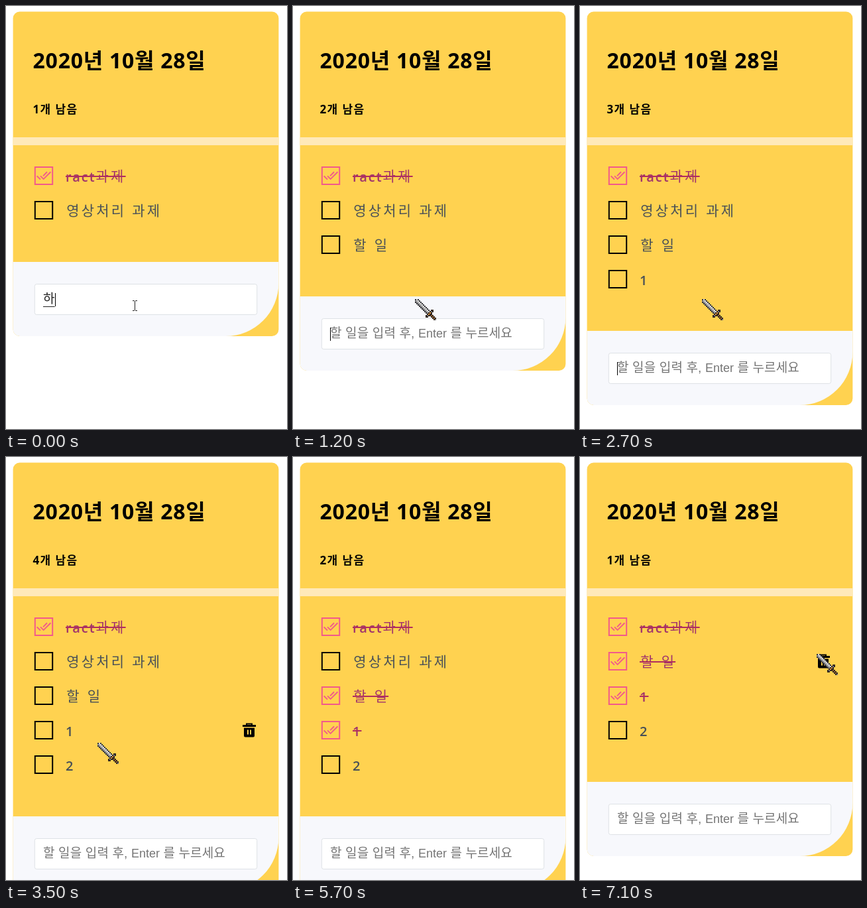
These frames come from a looping animation (424x638 px, 7700 ms). An HTML page:

```html
<!DOCTYPE html>
<html lang="ko">
<head>
<meta charset="utf-8">
<style>
html, body { margin: 0; width: 424px; height: 638px; overflow: hidden; background: #fff; }
svg { display: block; }
text { font-family: "Open Sans", "Noto Sans CJK KR", sans-serif; white-space: pre; }
.title { font-size: 32px; font-weight: 700; letter-spacing: .75px; }
.count { font-size: 17px; font-weight: 700; letter-spacing: 1.4px; }
.item { font-family: "Noto Sans CJK KR", sans-serif; font-size: 21px; font-weight: 300; letter-spacing: 3.2px; fill: #495057; }
.item .latin { font-family: "Open Sans", sans-serif; font-size: 20px; font-weight: 600; letter-spacing: 2px; baseline-shift: -1px; }
.done .item { fill: #a2356c; }
.field { font-family: "Liberation Sans", "Noto Sans CJK KR", sans-serif; font-size: 19px; font-weight: 300; letter-spacing: .15px; fill: #222; }
.field .latin { font-size: 18px; letter-spacing: 0; }
.field.hint { fill: #757575; }
</style>
</head>
<body>
<svg width="424" height="638" viewBox="0 0 424 638">
  <rect id="card" x="10.6" y="8.6" width="400.8" rx="10" fill="#ffd250"/>
  <rect x="10.6" y="198" width="400.8" height="12" fill="#ffe9b9"/>
  <text class="title" x="40.6" y="94.3">2020년 10월 28일</text>
  <text class="count" id="count" x="40.5" y="162"></text>
  <g id="list"></g>
  <g id="footer">
    <path d="M10.6 0H411.4V32A80 80 0 0 1 331.4 112H20.6A10 10 0 0 1 10.6 102Z" fill="#f7f8fc"/>
    <rect x="43.3" y="33.5" width="335.4" height="46" rx="3" fill="#fff" stroke="#dee2e6"/>
    <text class="field" id="field" x="56" y="62"></text>
    <rect id="underline" x="56" y="67" height="1" fill="#222"/>
    <rect id="caret" y="47" width="1" height="20" fill="#000"/>
  </g>
  <g id="trash">
    <path d="M362 -11H372V-8.5H377V-5.5H357V-8.5H362ZM364 -9V-8.5H370V-9ZM359 -4H375V8Q375 10 373 10H361Q359 10 359 8ZM364 -1V6H366V-1ZM368 -1V6H370V-1Z" fill-rule="evenodd"/>
  </g>
  <path id="beam" d="M191 444.5H193.5L194.5 445.5L195.5 444.5H198M194.5 445V459M191 459.5H193.5L194.5 458.5L195.5 459.5H198" fill="none" stroke="#222"/>
  <g id="sword" shape-rendering="crispEdges"></g>
</svg>
<script>
const LOOP = 7700, ROW = 52, LIST_TOP = 230;
const $ = id => document.getElementById(id);
const CHECK = 'M18 7l-1.41-1.41-6.34 6.34 1.41 1.41L18 7zm4.24-1.41L11.66 16.17 7.48 12l-1.41 1.41L11.66 19l12-12-1.42-1.41zM.41 13.41L6 19l1.41-1.41L1.83 12 .41 13.41z';
const HINT = '할 일을 입력 후, Enter 를 누르세요';

const items = [
  { text: 'ract과제', done: 0 },
  { text: '영상처리 과제', gone: 6400 },
  { text: '할 일', add: 900, done: 5100 },
  { text: '1', add: 2500, done: 4100 },
  { text: '2', add: 3000 }
];
const typing = [
  [0, '하'], [100, '할'], [300, '할 '], [500, '할 이'], [700, '할 일'],
  [900, ''], [2300, '1'], [2500, ''], [2900, '2'], [3000, '']
];
const caretOn = [[0, 1700], [2300, 3500]];
const path = [
  [0, 184, 442], [3100, 184, 442], [3500, 138, 431], [3900, 47, 402], [4400, 47, 402],
  [4800, 72, 362], [5000, 47, 350], [5200, 47, 350], [5600, 426, 340], [5800, 426, 320],
  [6000, 357, 297], [LOOP, 357, 297]
];

const mixed = text => text.replace(/\w+/g, word => `<tspan class="latin">${word}</tspan>`);
const show = (node, on) => node.setAttribute('visibility', on ? 'visible' : 'hidden');
const move = (node, x, y) => node.setAttribute('transform', `translate(${x} ${y})`);

for (const item of items) {
  const row = item.row = document.createElementNS('http://www.w3.org/2000/svg', 'g');
  const textX = /^\w/.test(item.text) ? 90 : 91.2;
  row.innerHTML = `<rect x="43.8" y="13" width="26.4" height="26" fill="none" stroke-width="2"/>
    <path d="${CHECK}" transform="translate(45.6 14.3) scale(.95)" fill="#f2598b"/>
    <text class="item" x="${textX}" y="34">${mixed(item.text)}</text>
    <rect x="90" y="26" height="2" fill="#b12d5e"/>`;
  [item.box, item.check, item.label, item.strike] = row.children;
  $('list').append(row);
}

// The sword lies on the diagonal of a 16 by 16 grid, tip at the top left.
function swordColor(x, y) {
  const along = x + y, off = x - y, side = Math.abs(off);
  if (along <= 19) {
    if (side > 2 || (side === 2 && along > 18)) return;
    if (side === 2 || along === 0) return '#35353a';
    return off > 0 ? '#d5d5d5' : off < 0 ? '#858588' : '#b4b4b4';
  }
  if (along <= 22) {
    if (side > 5) return;
    return along === 21 && side < 5 ? (side < 2 ? '#d8913f' : '#77777a') : '#30261f';
  }
  if (side > 1) return;
  return side ? '#30261f' : along > 28 ? '#77777a' : '#8a5a2c';
}
let pixels = '';
for (let y = 0; y < 16; y++) for (let x = 0; x < 16; x++) {
  const fill = swordColor(x, y);
  if (fill) pixels += `<rect x="${x * 2}" y="${y * 2}" width="2" height="2" fill="${fill}"/>`;
}
$('sword').innerHTML = pixels;

function pointerAt(t) {
  const i = path.findIndex(key => key[0] > t);
  const [t0, x0, y0] = path[i - 1], [t1, x1, y1] = path[i];
  const k = (t - t0) / (t1 - t0);
  return [Math.round(x0 + (x1 - x0) * k), Math.round(y0 + (y1 - y0) * k)];
}

function drawField(t) {
  const value = typing.filter(([at]) => at <= t).pop()[1];
  const field = $('field');
  field.innerHTML = mixed(value || HINT);
  field.setAttribute('class', value ? 'field' : 'field hint');
  const width = value ? field.getComputedTextLength() : 0;
  const composing = /[가-힣]$/.test(value);
  const start = composing ? field.getStartPositionOfChar(value.length - 1).x : 56;
  $('underline').setAttribute('x', start);
  $('underline').setAttribute('width', composing ? 56 + width - start : 0);
  $('caret').setAttribute('x', Math.round(56 + width));
  show($('caret'), caretOn.some(([from, to]) => t >= from && t < to));
}

function draw(t) {
  let rows = 0, left = 0;
  for (const { add = 0, done = LOOP, gone = LOOP, row, box, check, label, strike } of items) {
    const visible = t >= add && t < gone, checked = t >= done;
    row.style.display = visible ? '' : 'none';
    if (!visible) continue;
    move(row, 0, LIST_TOP + ROW * rows++);
    if (!checked) left++;
    row.setAttribute('class', checked ? 'done' : '');
    box.setAttribute('stroke', checked ? '#f2598b' : '#000');
    show(check, checked);
    show(strike, checked);
    strike.setAttribute('width', label.getComputedTextLength());
  }
  const top = 282 + ROW * rows;
  $('count').textContent = `${left}개 남음`;
  $('card').setAttribute('height', top + 112 - 8.6);
  move($('footer'), 0, top);
  drawField(t);

  const [x, y] = pointerAt(t);
  const hovered = Math.floor((y + 6 - LIST_TOP) / ROW);
  const typingFirst = t < 900;
  move($('sword'), x, y);
  show($('sword'), !typingFirst);
  show($('beam'), typingFirst);
  show($('trash'), !typingFirst && x + 10 < 411 && hovered >= 0 && hovered < rows);
  move($('trash'), 0, LIST_TOP + ROW * hovered + 26.5);
}

const start = performance.now();
function tick() {
  const t = (performance.now() - start) % LOOP;
  draw(Math.floor(t / 100) * 100);
  requestAnimationFrame(tick);
}
tick();
</script>
</body>
</html>
```
